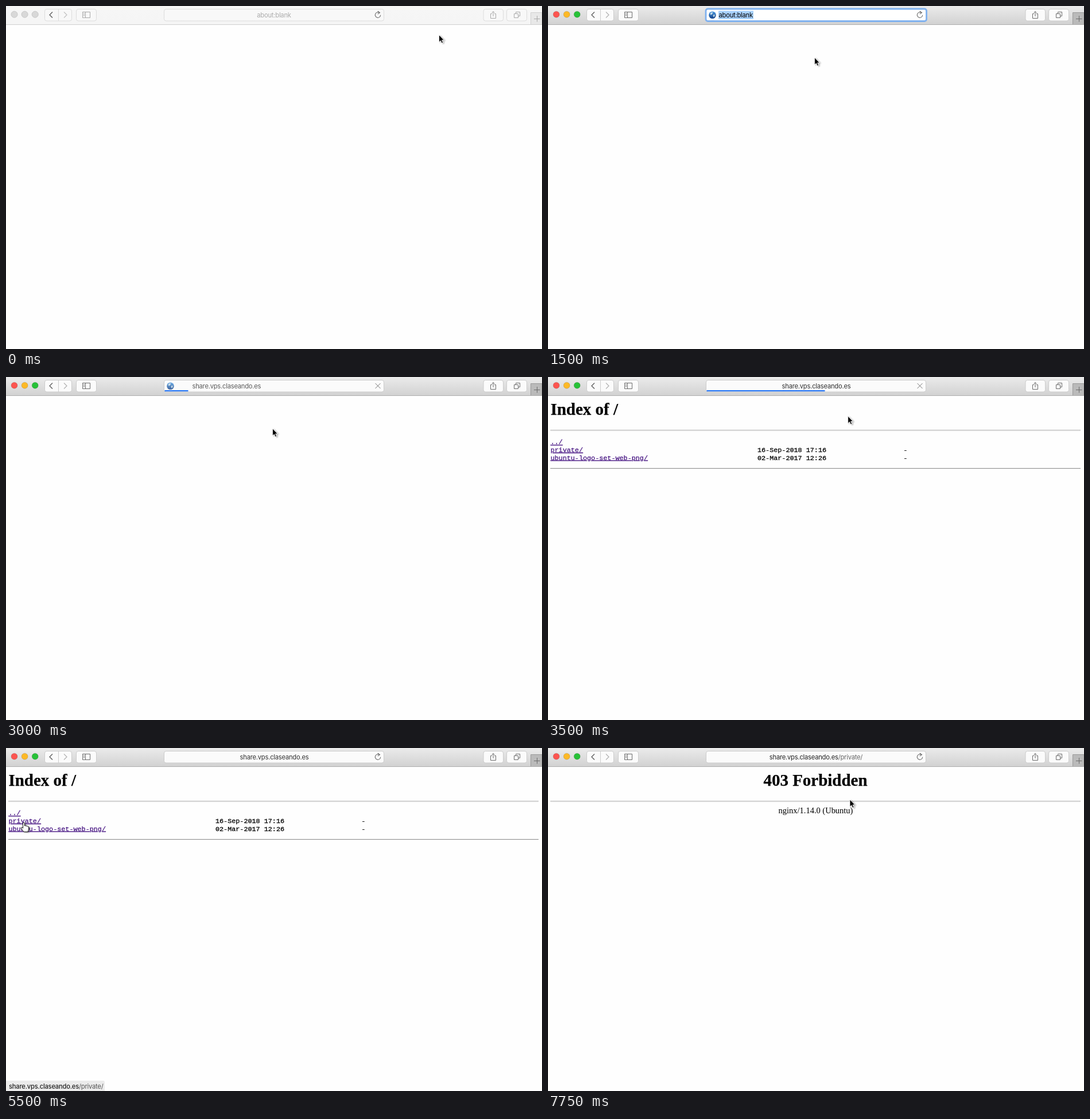
An HTML page for the animation above (8000 ms loop, 934 by 599 pixels).

```html
<!DOCTYPE html>
<html lang="es">
<head>
<meta charset="utf-8">
<title>Index of /</title>
<style>
  html, body { margin: 0; width: 100%; height: 100%; overflow: hidden; background: #fefefe; }
  svg {
    display: block;
    --top: #ebebeb; --bottom: #d2d2d2; --edge: #aeaeae;
    --button: #fbfbfb; --border: #cccccc; --icon: #6a6a6a; --faint: #b4b4b4;
    --red: #fc5550; --yellow: #fdb927; --green: #27c138; --ring: #0002;
    --tab: #bababa; --tabEdge: #999; --url: #333;
  }
  svg.inactive {
    --top: #f6f6f6; --bottom: #f5f5f5; --edge: #d0d0d0;
    --button: #f8f8f8; --border: #dcdcdc; --icon: #a8a8a8; --faint: #c4c4c4;
    --red: #d8d8d8; --yellow: #d8d8d8; --green: #d8d8d8; --ring: #c6c6c6;
    --tab: #e8e8e8; --tabEdge: #d0d0d0; --url: #ababab;
  }
  text { white-space: pre; }
  .ui { font: 11.2px Inter, sans-serif; letter-spacing: -.23px; }
  .small { font-size: 10.1px; letter-spacing: -.1px; fill: #444; }
  .site { font-size: 9.9px; letter-spacing: -.17px; fill: #444; }
  .mid { text-anchor: middle; }
  .serif { font: 14.48px "Liberation Serif", serif; }
  .title { font-size: 28.96px; font-weight: bold; stroke: #000; stroke-width: .25; }
  .mono { font: 11.77px "Liberation Mono", monospace; stroke: #000; stroke-width: .3; }
  .link { fill: #4b1a85; stroke: #4b1a85; text-decoration: underline; }
  .button { fill: var(--button); stroke: var(--border); }
  .icon { fill: none; stroke: var(--icon); }
</style>
</head>
<body>
<svg id="stage" width="934" height="599" viewBox="0 0 934 599">
  <defs>
    <linearGradient id="chrome" x2="0" y2="1">
      <stop style="stop-color:var(--top)"/><stop offset="1" style="stop-color:var(--bottom)"/>
    </linearGradient>
    <linearGradient id="sea" x2="0" y2="1">
      <stop stop-color="#4b9ae2"/><stop offset="1" stop-color="#123f86"/>
    </linearGradient>
    <filter id="shadow" x="-10%" y="-10%" width="120%" height="125%">
      <feDropShadow dy="3" stdDeviation="4" flood-opacity=".32"/>
    </filter>
    <filter id="soft" x="-50%" y="-50%" width="200%" height="200%">
      <feDropShadow dy="1" stdDeviation=".8" flood-opacity=".35"/>
    </filter>
    <g id="globe">
      <circle r="6.3" fill="url(#sea)"/>
      <path d="M-4-3L-1-5 1-4-1-1-3 0ZM1 0L4-1 4 2 2 4Z" fill="#e4f0ee" opacity=".8"/>
    </g>
  </defs>

  <rect width="934" height="599" fill="#fefefe"/>

  <!-- directory listing -->
  <g data-show="3500-6750">
    <text class="serif title" x="4.5" y="66">Index of /</text>
    <path d="M4 159.5H928" stroke="#929292"/><path d="M4 160.5H928" stroke="#eee"/>
    <g class="mono">
      <text class="link" x="4.5" y="117.3">../</text>
      <text class="link" x="4.5" y="130.9">private/</text>
      <text class="link" x="4.5" y="144.5">ubuntu-logo-set-web-png/</text>
      <text x="365" y="130.9">16-Sep-2018 17:16                   -</text>
      <text x="365" y="144.5">02-Mar-2017 12:26                   -</text>
    </g>
  </g>
  <!-- error page -->
  <g data-show="6750-8000" class="mid">
    <text class="serif title" x="466" y="66">403 Forbidden</text>
    <text class="serif" x="466.5" y="114">nginx/1.14.0 (Ubuntu)</text>
  </g>
  <g data-show="3500-8000">
    <path d="M4 93H928" stroke="#929292"/><path d="M4 94H928" stroke="#eee"/>
  </g>
  <g data-show="5000-7000" class="ui">
    <path d="M0 581H169a3 3 0 0 1 3 3V599H0Z" fill="#ebebeb"/>
    <text x="5" y="594.5" fill="#555"><tspan font-weight="500" fill="#222">share.vps.claseando.es</tspan>/private/</text>
  </g>

  <!-- toolbar -->
  <rect width="934" height="32" fill="url(#chrome)"/>
  <path d="M0 32.5H934" style="stroke:var(--edge)"/>
  <g style="stroke:var(--ring)">
    <circle cx="14.5" cy="14.7" r="5.5" style="fill:var(--red)"/>
    <circle cx="32.6" cy="14.7" r="5.5" style="fill:var(--yellow)"/>
    <circle cx="50.7" cy="14.7" r="5.5" style="fill:var(--green)"/>
  </g>
  <g class="button">
    <rect x="67.5" y="5.5" width="47" height="20.5" rx="3.5"/><path d="M91.5 6V26"/>
    <rect x="122.5" y="5.5" width="35" height="20.5" rx="3.5"/>
    <rect x="832" y="5.5" width="34.5" height="20.5" rx="3.5"/>
    <rect x="872.5" y="5.5" width="35" height="20.5" rx="3.5"/>
    <rect x="275.5" y="5.5" width="383" height="20.5" rx="3.5"/>
  </g>
  <path d="M914.5 32V11.5H934V32" style="fill:var(--tab);stroke:var(--tabEdge)"/>
  <g class="icon">
    <path d="M81 10.5L76 15.5 81 20.5" stroke-width="1.4" style="stroke:#606060"/>
    <path d="M101 10.5L106 15.5 101 20.5" style="stroke:var(--faint)" stroke-width="1.3"/>
    <path d="M133.5 10.5H146.5V20.5H133.5ZM138.5 10.5V20.5M135 13H137M135 15H137M135 17H137"/>
    <path d="M847 13.5H844.5V21.5H853.5V13.5H851M849 18V9.5M846.5 12L849 9.5 851.5 12"/>
    <path d="M885.5 13.5H892.5V20.5H885.5ZM888.5 13V10.5H895.5V17.5H893"/>
    <path d="M925.5 17V27.5M920 22.5H930.5"/>
  </g>

  <!-- address bar -->
  <rect data-show="1000-3000" x="275" y="5" width="384.5" height="21.5" rx="3.5" fill="#fff" stroke="#7fb1ef" stroke-width="2.8"/>
  <path data-show="0-3000 4000-6500 7250-8000" d="M651 12A4.7 4.7 0 1 0 652.7 15.7M647.8 9L651.5 11.8 647.8 14" fill="none" stroke="#707070" stroke-width="1.1"/>
  <path data-show="3000-4000 6500-7250" d="M643.5 11L652.5 20M652.5 11L643.5 20" stroke="#777"/>
  <rect id="progress" x="276.5" y="23" height="2.2" fill="#2676f5"/>
  <use data-show="1000-3000" href="#globe" x="286.5" y="15.7"/>
  <use data-show="3000-3250" href="#globe" x="286.5" y="15.7" opacity=".8"/>
  <g class="ui">
    <text data-show="0-1000" class="mid" x="467" y="19.7" style="fill:var(--url)">about:blank</text>
    <g data-show="1000-2000">
      <rect x="297" y="8.5" width="61" height="14.5" fill="#a8d1fd"/>
      <text x="297.5" y="19.7">about:blank</text>
    </g>
    <g data-show="2000-3000">
      <rect id="completion" y="8.5" height="14.5" fill="#a8d1fd"/>
      <text id="typed" x="297.5" y="19.7">share.vps.claseando.es</text>
      <text x="418.5" y="19.7" fill="#2a68d8" font-size="10.6">— Index of /</text>
    </g>
    <text data-show="3000-3250" x="324.5" y="19.7" fill="#5c5c5c">share.vps.claseando.es</text>
    <text data-show="3250-6500" class="mid" x="467.5" y="19.7" fill="#333">share.vps.claseando.es</text>
    <text data-show="6500-8000" class="mid" x="467" y="19.7" fill="#666"><tspan fill="#222">share.vps.claseando.es</tspan>/private/</text>
  </g>

  <!-- suggestions -->
  <g data-show="2250-3000" class="ui">
    <path d="M275 28.5H659.5V210a5 5 0 0 1-5 5H280a5 5 0 0 1-5-5Z" fill="#ededed" stroke="#c4c4c4" stroke-width=".5" filter="url(#shadow)"/>
    <rect x="275" y="48.5" width="384.5" height="17.5" fill="#005cd6"/>
    <path d="M275 72.5H659.5M275 117H659.5" stroke="#cfcfcf"/>
    <g class="small">
      <text x="288.5" y="44.7">Mejor resultado</text>
      <text x="288.5" y="89">Búsqueda en Zurbel</text>
      <text x="288.5" y="133.2">Marcadores e historial</text>
    </g>
    <use href="#globe" x="308" y="57.7"/>
    <text x="319" y="61.7" fill="#fff">Index of /</text>
    <text x="370" y="61.7" class="small" style="fill:#c6dcfa">— share.vps.claseando.es</text>
    <path d="M310 104L313 107M311 101a4 4 0 1 0-8 0a4 4 0 1 0 8 0" fill="none" stroke="#666" stroke-width="1.1"/>
    <text id="query" x="319" y="106"></text>
    <g id="history"></g>
  </g>

  <!-- pointer -->
  <g id="pointer" stroke="#fff" filter="url(#soft)">
    <path id="arrow" d="M0 0V12.6L2.9 10 4.9 14.5 7 13.6 5.1 9.2H8.8Z" stroke-width=".8"/>
    <path id="beam" d="M-2.5-7Q0-7 0-5Q0-7 2.5-7M0-5V6M-2.5 8Q0 8 0 6Q0 8 2.5 8" fill="none" stroke="#222" stroke-width="1.1"/>
    <path id="hand" d="M-1.5 9V1Q0-1 1.5 1V6Q3 4.5 4 6.3Q5.5 5.3 6.5 7Q8 6.3 8.4 8V12L7 16.5H0L-5 10Q-4.5 7.5-1.5 10Z" fill="#fff" stroke="#111"/>
  </g>
</svg>

<script>
const LOOP = 8000, STEP = 250;
const $ = id => document.getElementById(id);
const show = (el, on) => el.style.display = on ? '' : 'none';

$('history').innerHTML = [
  '403 Forbidden',
  'ubuntu_black_hex_su.png 284×64 píxeles',
  'Index of /ubuntu-logo-set-web-png/PNG_s...',
  'Index of /ubuntu-logo-set-web-png/'
].map((title, i) => {
  const y = 150.4 + i * 18.1;
  return `<text x="300" y="${y}">${title}</text><text class="site" x="545" y="${y}">share.vps.claseand...</text>`;
}).join('');

const timed = [...document.querySelectorAll('[data-show]')].map(el => ({
  el, ranges: el.dataset.show.split(' ').map(r => r.split('-').map(Number))
}));

// time, x, y of the pointer tip
const path = [
  [0, 754.5, 50.5], [750, 467, 15], [1000, 467, 15], [1250, 439, 33], [1500, 464.5, 90],
  [3250, 464.5, 90], [4000, 639, 25], [4500, 64, 174], [5000, 31, 130], [5250, 30, 130],
  [5500, 31, 130], [6500, 31, 130], [6750, 60, 153], [7500, 471, 207], [7750, 526, 90]
];
const loads = { 3000: 41, 3250: 120, 3500: 206, 3750: 382, 6500: 41, 6750: 206, 7000: 382 };
const typing = { 2000: 1, 2250: 4 };

function pointerAt(t) {
  const i = path.findIndex(p => p[0] >= t);
  if (i < 1) return path[0].slice(1);
  const [t0, x0, y0] = path[i - 1], [t1, x1, y1] = path[i];
  const k = (t - t0) / (t1 - t0);
  return [x0 + (x1 - x0) * k, y0 + (y1 - y0) * k];
}

function draw(t) {
  $('stage').classList.toggle('inactive', t < 750);
  for (const { el, ranges } of timed) show(el, ranges.some(([a, b]) => t >= a && t < b));
  $('progress').setAttribute('width', loads[t] || 0);

  if (t >= 2000 && t < 3000) {
    const count = typing[t] || 5;
    const x = 297.5 + $('typed').getSubStringLength(0, count);
    $('completion').setAttribute('x', x);
    $('completion').setAttribute('width', 478 - x);
    $('query').textContent = 'share'.slice(0, count);
  }

  const [x, y] = pointerAt(t);
  const hand = t >= 5000 && t <= 6500;
  const beam = y < 25 && x > 275 && x < 659;
  $('pointer').setAttribute('transform', `translate(${x} ${y})`);
  show($('hand'), hand);
  show($('beam'), beam);
  show($('arrow'), !hand && !beam);
}

function frame() {
  draw(Math.floor(performance.now() % LOOP / STEP) * STEP);
  requestAnimationFrame(frame);
}
frame();
</script>
</body>
</html>
```
